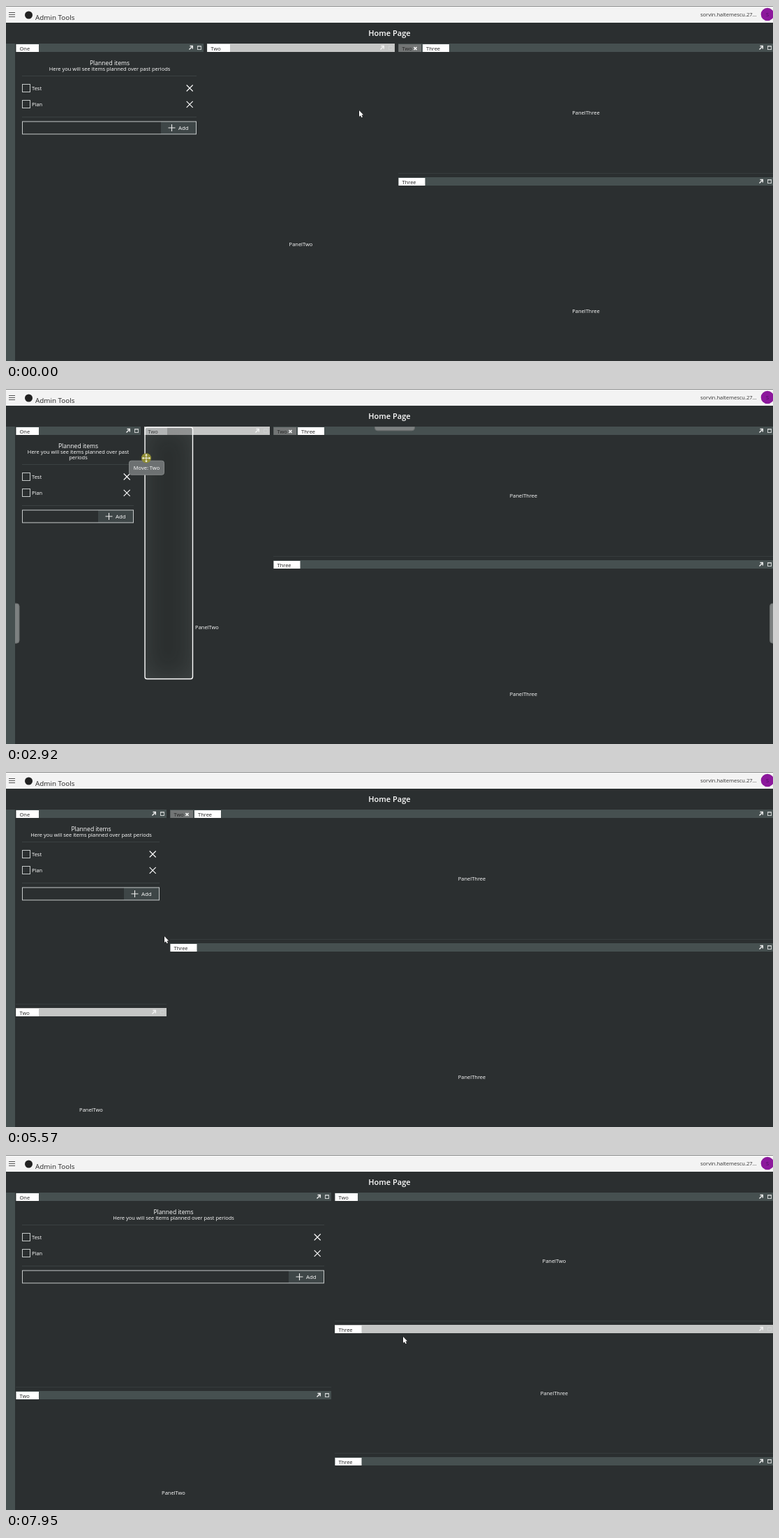
Animation of 1099x510 px, one loop 8000 ms. Source, as an HTML page with a canvas:

```html
<!DOCTYPE html>
<html lang="en">
<head>
<meta charset="utf-8">
<title>Admin Tools</title>
<style>
  html, body { margin: 0; width: 100%; height: 100%; overflow: hidden; background: #2b2f30; }
  canvas { display: block; }
</style>
</head>
<body>
<canvas id="stage" width="1099" height="510"></canvas>
<script>
const ctx = document.getElementById('stage').getContext('2d');
const LOOP = 8000, GAP = 5, BAR = 12, HOP = 290;
const C = { bg: '#2b2f30', bar: '#465050', active: '#c5c6c5', rule: '#3b4142', white: '#fff', dark: '#222' };
const area = { l: 14, t: 54.3, r: 1100, b: 619 };

// Share a box between children by weight, along x (l/r) or y (t/b)
function share(box, axis, ...weights) {
  const [lo, hi] = axis === 'x' ? ['l', 'r'] : ['t', 'b'];
  const room = box[hi] - box[lo] - GAP * (weights.length - 1);
  const total = weights.reduce((a, b) => a + b);
  let at = box[lo];
  return weights.map(w => {
    const start = at, end = at + room * w / total;
    at = end + GAP;
    return { ...box, [lo]: start, [hi]: end };
  });
}

function half(box, side) {
  const mid = { l: (box.l + box.r) / 2, t: (box.t + box.b) / 2 };
  return {
    left: { ...box, r: mid.l }, right: { ...box, l: mid.l },
    top: { ...box, b: mid.t }, bottom: { ...box, t: mid.t }
  }[side];
}

const tabOf = box => ({ ...box, r: box.l + 33, b: box.t + BAR });
const set = (box, active, ...tabs) => ({ box, active, tabs });

function threeColumns(...weights) {
  const [one, two, side] = share(area, 'x', ...weights);
  const [upper, lower] = share(side, 'y', 1, 2);
  return [set(one, false, 'One'), set(two, true, 'Two'), set(upper, false, 'Two', 'Three'), set(lower, false, 'Three')];
}

function twoColumns(leftShare, stacked) {
  const [left, right] = share(area, 'x', leftShare, 1 - leftShare);
  const [one, two] = share(left, 'y', 1, 1);
  const side = stacked
    ? share(right, 'y', 1, 1, 1).map((box, i) => set(box, i === 1, i ? 'Three' : 'Two'))
    : share(right, 'y', 1, 2).map((box, i) => set(box, false, ...(i ? ['Three'] : ['Two', 'Three'])));
  return [set(one, false, 'One'), set(two, !stacked, 'Two'), ...side];
}

const wide = threeColumns(1, 1, 2), narrow = threeColumns(1, 1, 4);
const docked = twoColumns(0.2), widened = twoColumns(0.418), stacked = twoColumns(0.418, true);
const scenes = [[0, wide], [2110, narrow], [4660, docked], [6440, widened], [7570, stacked]];
const resize = { from: 5710, to: 6440 };

// Each hop sends the drop preview to a new box
const drags = [
  { from: 1060, to: 2110, label: 'Move: Two', hops: [
    [0, tabOf(wide[1].box)], [1060, half(wide[1].box, 'left')], [1540, half(wide[0].box, 'right')]] },
  { from: 2750, to: 4660, label: 'Move: Two', hops: [
    [0, tabOf(narrow[1].box)], [2750, half(narrow[1].box, 'left')],
    [3465, half(narrow[0].box, 'right')], [3850, half(narrow[0].box, 'bottom')]] },
  { from: 7200, to: 7570, label: 'Move: Three', hops: [
    [0, half(widened[2].box, 'top')], [7300, half(widened[2].box, 'bottom')]] }
];

// Pointer glides: start, end, x, y; it rests in between
const glides = [
  [0, 0, 506, 150], [190, 250, 497, 148], [400, 720, 291, 45], [720, 790, 298, 58],
  [1060, 1810, 223, 331], [2150, 2640, 209, 59], [2750, 3580, 136, 425], [3600, 4400, 142, 493],
  [4660, 5160, 240, 232], [5230, 5500, 227, 236], [5700, 5780, 249, 240], [6030, 6400, 466, 245],
  [6460, 6790, 520, 62], [6860, 7000, 518, 68], [7190, 7200, 530, 107], [7200, 7570, 550, 200],
  [7570, 7750, 592, 294], [7890, 7940, 569, 261]
];

const clamp = u => Math.max(0, Math.min(1, u));
const ease = u => u * u * (3 - 2 * u);
const mix = (a, b, u) => a + (b - a) * u;

function pointerAt(t) {
  let x = 0, y = 0;
  for (const [start, end, gx, gy] of glides) {
    if (t < start) break;
    const u = ease(clamp((t - start) / (end - start || 1) + (end === start)));
    x = mix(x, gx, u);
    y = mix(y, gy, u);
  }
  return [x, y];
}

function previewAt(hops, t) {
  return hops.reduce((box, [start, next]) => {
    if (!start) return next;
    const u = ease(clamp((t - start) / HOP)), out = {};
    for (const k in next) out[k] = mix(box[k], next[k], u);
    return out;
  }, null);
}

function rect(x, y, w, h, color) {
  ctx.fillStyle = color;
  ctx.fillRect(x, y, w, h);
}

function round(x, y, w, h, r) {
  ctx.beginPath();
  ctx.roundRect(x, y, w, h, r);
}

function disc(x, y, r, color) {
  ctx.fillStyle = color;
  ctx.beginPath();
  ctx.arc(x, y, r, 0, Math.PI * 2);
  ctx.fill();
}

function text(str, x, y, size = 7.5, color = C.white, align = 'left', weight = 500) {
  ctx.font = `${weight} ${size}px "Open Sans", "Noto Sans", sans-serif`;
  ctx.fillStyle = color;
  ctx.textAlign = align;
  ctx.fillText(str, x, y + size * 0.36);
}

// Each segment is x1, y1, x2, y2
function lines(color, width, ...segments) {
  ctx.strokeStyle = color;
  ctx.lineWidth = width;
  ctx.beginPath();
  for (const [a, b, c, d] of segments) {
    ctx.moveTo(a, b);
    ctx.lineTo(c, d);
  }
  ctx.stroke();
}

function cross(x, y, r, width) {
  lines(C.white, width, [x - r, y - r, x + r, y + r], [x - r, y + r, x + r, y - r]);
}

function frame(x, y, w, h, color) {
  ctx.strokeStyle = color;
  ctx.lineWidth = 1;
  ctx.strokeRect(x + 0.5, y + 0.5, w - 1, h - 1);
}

function plate(fill, edge) {
  ctx.fillStyle = fill;
  ctx.fill();
  ctx.strokeStyle = edge;
  ctx.lineWidth = 1;
  ctx.stroke();
}

function pageHeader() {
  rect(0, 0, 1099, 24, '#f3f3f3');
  rect(0, 0, 1099, 1, '#8b8d8d');
  for (const y of [9, 12, 15]) rect(4, y, 9, 1, '#555');
  disc(32.5, 13, 5.5, '#222');
  text('Admin Tools', 42, 16, 9.85, '#222', 'left', 400);
  text('sorvin.haltemescu.27...', 995, 12.5, 7.5, '#333', 'left', 400);
  disc(1091, 12, 9.3, '#8c189c');
  text('S', 1091, 12, 7.5, '#4c1060', 'center');
  text('Home Page', 549.5, 39.5, 11, C.white, 'center', 600);
  rect(0, 54, 13, 456, C.bar);
}

function panelIcons(right, y) {
  const x = right - 18;
  lines('#f2f2f2', 1.4, [x - 2.5, y + 8.5, x + 1.5, y + 4.5]);
  lines('#f2f2f2', 1.4, [x - 1.5, y + 3.5, x + 3, y + 3.5], [x + 2.3, y + 3, x + 2.3, y + 7.5]);
  frame(right - 9, y + 3, 6, 6, '#cdd0d0');
  rect(right - 9, y + 3, 6, 1.5, '#cdd0d0');
}

function tab(label, x, y, width, selected) {
  rect(x, y + 1, width, BAR - 1, selected ? C.white : '#727575');
  text(label, x + 5, y + 7, 7.5, C.dark);
  if (!selected) cross(x + 24, y + 7, 2, 1.5);
}

function panel({ box, active, tabs }) {
  const [left, top, right, bottom] = [box.l, box.t, box.r, box.b].map(Math.round);
  rect(left, top, right - left, BAR, active ? C.active : C.bar);
  let x = left + 0.5;
  tabs.forEach((label, i) => {
    const width = label === 'Three' ? 38 : 32.5;
    tab(label, x, top, width, i === tabs.length - 1);
    x += width + 2;
  });
  panelIcons(right, top);
  rect(left, bottom - 1, right - left, 1, '#363c3d');
  const name = tabs[tabs.length - 1];
  if (name === 'One') planner(left, right);
  else text('Panel' + name, (left + right) / 2, (top + BAR + bottom) / 2, 7.5, C.white, 'center');
}

function planner(left, right) {
  const mid = (left + right) / 2, inner = left + 9, end = right - 10;
  const wrap = end - inner < 180, dy = wrap ? 8 : 0, edge = '#c6caca';
  text('Planned items', mid, 81.5, 8.6, C.white, 'center');
  const intro = wrap ? ['Here you will see items planned over past', 'periods']
                     : ['Here you will see items planned over past periods'];
  intro.forEach((line, i) => text(line, mid, 90 + i * 8, 7.5, C.white, 'center'));
  rect(inner, 100 + dy, end - inner, 1, C.rule);
  ['Test', 'Plan'].forEach((name, i) => {
    const y = 118 + i * 23.3 + dy;
    frame(inner, Math.round(y - 6), 12, 12, edge);
    text(name, inner + 14, y + 0.3);
    cross(right - 19.8, y, 4.5, 1.1);
  });
  rect(inner, 159 + dy, end - inner, 1, C.rule);
  rect(end - 51, 166 + dy, 51, 18, '#3e4647');
  frame(inner, 165.5 + dy, end - inner, 19, edge);
  const px = end - 35.5, py = 175 + dy;
  lines('#eee', 1.1, [px - 5, py, px + 5, py], [px, py - 5, px, py + 5]);
  text('Add', end - 26, py + 0.3, 7.8);
}

function preview({ l, t, r, b }) {
  const w = r - l, h = b - t;
  ctx.save();
  round(l, t, w, h, 3);
  ctx.clip();
  rect(l, t, w, h, 'rgba(43,47,48,.35)');
  ctx.shadowColor = 'rgba(150,160,160,.2)';
  ctx.shadowBlur = 36;
  ctx.fillStyle = '#000';
  ctx.beginPath();
  ctx.rect(l - 60, t - 60, w + 120, h + 120);
  ctx.rect(l, t, w, h);
  ctx.fill('evenodd');
  ctx.restore();
  round(l + 0.7, t + 0.7, w - 0.4, h - 0.4, 3);
  ctx.strokeStyle = C.white;
  ctx.lineWidth = 1.4;
  ctx.stroke();
}

// Grips centred on the area's edges, clipped to their inner half
function edgeHandles() {
  const { l, t, r, b } = area, long = 57, thick = 11;
  ctx.save();
  ctx.beginPath();
  ctx.rect(l - 1, t, r - l + 1, b - t);
  ctx.clip();
  for (const x of [l - 0.5, r]) {
    round(x - thick / 2, (t + b - long) / 2, thick, long, 4);
    plate('#7d8181', '#686c6c');
  }
  round((l + r - long) / 2, t - thick / 2, long, thick, 4);
  plate('#7d8181', '#686c6c');
  ctx.restore();
}

function dragLabel(label, x, y) {
  const w = label.length > 9 ? 57 : 50;
  round(x - w / 2 + 0.5, y + 4, w, 20, 3);
  plate('#6d7172', '#858989');
  text(label, x + 0.5, y + 14, 7.5, C.white, 'center');
}

function arrowHeads(x, y, angles, reach) {
  ctx.fillStyle = C.white;
  for (const a of angles) {
    ctx.save();
    ctx.translate(x, y);
    ctx.rotate(a * Math.PI / 2);
    ctx.fillRect(0, -0.4, reach - 2, 0.8);
    ctx.beginPath();
    ctx.moveTo(reach, 0);
    ctx.lineTo(reach - 2.2, -1.7);
    ctx.lineTo(reach - 2.2, 1.7);
    ctx.fill();
    ctx.restore();
  }
}

function moveCursor(x, y) {
  disc(x, y, 7, '#8f8d35');
  arrowHeads(x, y, [0, 1, 2, 3], 6);
}

function arrowCursor(x, y) {
  const outline = [[0, 0], [0, 9], [2, 7.2], [3.5, 10.2], [4.9, 9.5], [3.5, 6.6], [6.2, 6.4]];
  ctx.beginPath();
  outline.forEach(([dx, dy]) => ctx.lineTo(x + dx, y + dy));
  ctx.closePath();
  plate(C.white, '#111');
  ctx.fill();
}

function draw(t) {
  const [x, y] = pointerAt(t);
  const drag = drags.find(d => t >= d.from && t < d.to);
  const [, panels] = scenes.filter(([start]) => t >= start).pop();
  rect(0, 0, 1099, 510, C.bg);
  pageHeader();
  panels.forEach(panel);
  if (drag) {
    preview(previewAt(drag.hops, t));
    edgeHandles();
    if (t >= drag.from + 65) dragLabel(drag.label, x, y);
    moveCursor(x, y);
  } else if (t >= resize.from && t < resize.to) {
    rect(x, 54, GAP, 456, '#727676');
    arrowHeads(x + GAP / 2, y, [0, 2], 6);
  } else {
    arrowCursor(x, y);
  }
}

function tick() {
  draw(performance.now() % LOOP);
  requestAnimationFrame(tick);
}
tick();
</script>
</body>
</html>
```
